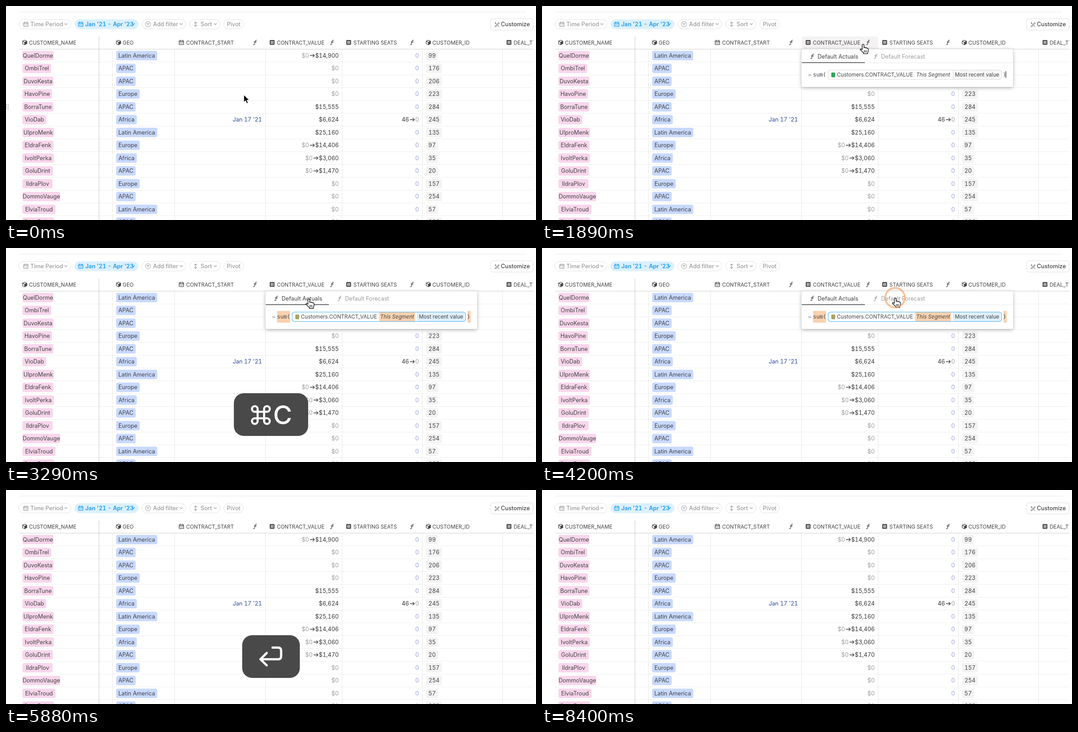
An HTML page for the animation above (9030 ms loop, 1177x476 px).

```html
<!DOCTYPE html>
<html lang="en">
<head>
<meta charset="utf-8">
<title>Table formula editing</title>
<style>
  html, body { margin: 0; width: 100%; height: 100%; overflow: hidden; background: #fff; }
  svg { display: block; font: 12.6px Inter, sans-serif; font-variant-numeric: tabular-nums; fill: #424242; }
  .head { font-size: 11.6px; }
  .tool { font-size: 12.7px; font-weight: 500; fill: #9b9b9b; }
  .formula { font-size: 11.65px; }
  .mono { font: 12px "DejaVu Sans Mono", monospace; }
  .big { font-size: 58px; font-weight: 500; fill: #fff; }
  .line { fill: none; stroke: currentColor; stroke-linecap: round; stroke-linejoin: round; }
</style>
</head>
<body>
<svg id="stage" width="1177" height="476" viewBox="0 0 1177 476"></svg>
<script>
const LOOP = 9030, ROW = 28.5, TOP = 96;
const DARK = '#424242', GRAY = '#9b9b9b', BLUE = '#1b9cf2', ORANGE = '#fbd1ae';

const text = (x, y, str, attrs = '') => `<text x="${x}" y="${y}" ${attrs}>${str}</text>`;
const rect = (x, y, w, h, fill, attrs = '') =>
  `<rect x="${x}" y="${y}" width="${w}" height="${h}" fill="${fill}" ${attrs}/>`;
const path = (d, color = DARK, width = 1.2, attrs = '') =>
  `<path class="line" d="${d}" color="${color}" stroke-width="${width}" ${attrs}/>`;
const at = (x, y, body) => `<g transform="translate(${x} ${y})">${body}</g>`;
const chip = (x, y, w, fill, str) =>
  rect(x, y - 10.5, w, 21, fill, 'rx="4"') + text(x + w / 2, y + 4.5, str, 'text-anchor="middle"');

// Icons, each centred on the given point
const cube = (x, y) => at(x, y,
  path('M0-5 4.8-2.6V2.8L0 5.2-4.8 2.8V-2.6ZM-4.8-2.6 0-.2 4.8-2.6M0-.2V5') +
  `<path d="M0-.2 4.8-2.6V2.8L0 5.2Z" fill="${DARK}"/>`);
const hash = (x, y) => at(x, y, rect(-5.3, -5.3, 10.6, 10.6, DARK, 'rx="1.5"') +
  path('M-1.5-3V3M1.7-3V3M-3.2-1.5H3.2M-3.2 1.6H3.2', '#fff', 1));
const calendar = (x, y, color = DARK) => at(x, y,
  path('M-4-4H4Q5-4 5-3V4Q5 5 4 5H-4Q-5 5-5 4V-3Q-5-4-4-4ZM-5-1.4H5M-2.5-5.5V-3M2.5-5.5V-3', color) +
  path('M-2.5 1H-2.4M0 1H.1M2.5 1H2.6M-2.5 3.2H-2.4M0 3.2H.1M2.5 3.2H2.6', color));
const fn = (x, y, color = DARK) => at(x, y,
  path('M3.6-4.6Q.9-5.5.4-2.6L-.7 2.8Q-1.2 5.5-3.6 4.6M-2-1H2.8', color, 1.3));
const chevron = (x, color = GRAY) => path(`M${x - 2.6} 39l2.6 2.6 2.6-2.6`, color);
const arrow = (x, y) => path(`M${x} ${y}h9.4m-3.4-3.4 3.4 3.4-3.4 3.4`, DARK, 1.3);

function toolbar() {
  const pill = (x, end, fill = '#fff', stroke = '#e2e2e2') =>
    rect(x + .5, 30, end - x - 1, 21, fill, `rx="10.5" stroke="${stroke}"`);
  const label = (x, str, attrs = '') => text(x, 45, str, `class="tool" ${attrs}`);
  return rect(29, 13, 1127, 1, '#e9e9e9') +
    pill(28, 145) + calendar(44, 40.5, GRAY) + label(54, 'Time Period') + chevron(133) +
    pill(152, 294, '#dcf0fd', '#dcf0fd') + calendar(166, 40.5, BLUE) +
    label(176, "Jan '21 - Apr '23", `style="fill:${BLUE};font-weight:600"`) + chevron(283, BLUE) +
    pill(301, 400) + path('M309.5 40.5a6 6 0 1 0 12 0a6 6 0 1 0-12 0M312.5 38.5h6M313.5 40.7h4M314.7 43h1.6', GRAY, 1) +
    label(326.5, 'Add filter') + chevron(389) +
    pill(407, 476) + path('M421 35.5v10M418.5 38l2.5-2.6 2.5 2.6M418.5 43l2.5 2.6 2.5-2.6', GRAY) +
    label(432, 'Sort') + chevron(465) +
    pill(483, 528) + label(490.5, 'Pivot') +
    rect(1076.5, 28.5, 94, 25, '#fff', 'rx="5" stroke="#dedede"') +
    path('M1086 45l8-8 1.5 1.5-8 8ZM1086 37l3 3M1092 43l3 3M1086.5 38.5l1.5-1.5', DARK, 1) +
    label(1099, 'Customize', `style="fill:${DARK}"`);
}

function header() {
  const label = (x, str) => text(x, 85.6, str, 'class="head"');
  return cube(41.5, 81) + label(51, 'CUSTOMER_NAME') +
    cube(250, 81) + label(259, 'GEO') +
    calendar(389.5, 81) + label(400, 'CONTRACT_START') + fn(553, 81) +
    hash(591, 81) + label(601.5, 'CONTRACT_VALUE') + fn(724, 81) +
    hash(761, 81) + label(771.5, 'STARTING SEATS') + fn(901.5, 81) +
    cube(938, 81) + label(947, 'CUSTOMER_ID') +
    hash(1117, 81) + label(1127.5, 'DEAL_TYPE') +
    rect(1171, 60, 6, 416, '#fff') + rect(29, 95.5, 1142, 1, '#cdcdcd');
}

// name, name chip width, region, contract value, value was $0 before, id
const customers = [
  ['QuelDorme', 69, 'Latin America', '$14,900', 1, 99],
  ['OmbiTrel', 64, 'APAC', '$0', 0, 176],
  ['DuvoKesta', 69, 'APAC', '$0', 0, 206],
  ['HavoPine', 65.5, 'Europe', '$0', 0, 223],
  ['BorraTune', 69, 'APAC', '$15,555', 0, 284],
  ['VioDab', 53, 'Africa', '$6,624', 0, 245],
  ['UlproMenk', 70, 'Latin America', '$25,160', 0, 135],
  ['EldraFenk', 69, 'Europe', '$14,406', 1, 97],
  ['IvoltPerka', 70, 'Africa', '$3,060', 1, 35],
  ['GoluDrint', 67.5, 'APAC', '$1,470', 1, 20],
  ['IldraPlov', 67, 'Europe', '$0', 0, 157],
  ['DommoVauge', 84, 'APAC', '$0', 0, 254],
  ['ElviaTroud', 73.5, 'Latin America', '$0', 0, 57],
  ['GuvaBolne', 70, 'APAC', '$0', 0, 268]
];
const geoWidth = { 'Latin America': 91.5, APAC: 43.5, Europe: 52.5, Africa: 46 };

function tableRow([name, nameWidth, geo, value, changed, id], i) {
  const y = TOP + ROW * (i + .5), base = y + 4.5;
  const right = (x, str, color) => text(x, base, str, `text-anchor="end" style="fill:${color}"`);
  const valueStart = 739 - (value.length - 1) * 8 - 4;
  return rect(29, y + ROW / 2 - .5, 1142, 1, '#eeeeee') +
    chip(36.5, y, nameWidth, '#f8d6ec', name) +
    chip(244.5, y, geoWidth[geo], '#c8d9fe', geo) +
    chip(933, y, id > 99 ? 35 : 26.5, '#f3f3f3', id) +
    right(739, value, value === '$0' ? GRAY : '#333') +
    (changed ? arrow(valueStart - 11.5, y) + right(valueStart - 14, '$0', GRAY) : '') +
    (i === 5
      ? right(568.5, "Jan 17 '21", '#2d4b9b') + right(895, '46', '#333') + arrow(897.5, y) + right(917, '0', GRAY)
      : right(917, '0', '#949fd6'));
}

const columnLines = () =>
  [236, 374, 576, 746, 924, 1102].map(x => rect(x, TOP, 1, 380, '#e8e8e8')).join('') +
  rect(206, 68, 1, 408, '#c6c6c6');

function popover(id, { forecast, short, selected }) {
  const width = short ? 441.5 : 469.5;
  const tab = (x, str, active) => fn(x, 112, active ? DARK : GRAY) +
    text(x + 12, 116.5, str, `style="fill:${active ? DARK : GRAY}"`);
  const [start, end, split] = short ? [606.5, 875.5, 806] : [635.5, 1020.5, 912];
  const italicX = short ? 725 : 831;
  const mark = (x, w, y = 140, h = 26) => selected ? rect(x, y, w, h, ORANGE) : '';
  const label = (x, str, attrs = '') => text(x, 157, str, `class="formula" ${attrs}`);
  const mono = (x, str, color = DARK) => text(x, 157, str, `class="mono" style="fill:${color}"`);
  const edge = selected ? '#45b0f3' : '#dcdcdc';
  const outline = (fill, stroke) => rect(start, 142.5, end - start, 21, fill, `rx="5" stroke="${stroke}"`);
  return `<g id="${id}" display="none">` +
    rect(576.5, 96, width, 84, '#fff', 'rx="4" filter="url(#shadow)"') +
    rect(577, 126, width - 1, 1, '#e9e9e9') +
    (forecast ? rect(717, 125.2, 148, 1.5, DARK) : rect(577, 125.2, 140, 1.5, DARK)) +
    tab(600, 'Default Actuals', !forecast) + tab(741, 'Default Forecast', forecast) +
    mono(591, '=', GRAY) +
    (short ? mark(600, 7) + mark(879, 8) : mark(602, 29) + mark(1025, 7) + mono(602, 'sum(') + mono(1023.5, ')')) +
    outline('#fff', edge) +
    rect(split, 143, end - split - 2, 20, selected ? '#dfeffc' : '#f6f6f6') +
    (selected ? mark(italicX - 2, 79.5, 143, 20) : rect(split, 143, 1, 20, '#e2e2e2')) +
    outline('none', edge) +
    (short
      ? label(612, 'CONTRACT_VALUE') + label(810.5, 'Last month')
      : rect(642.5, 148, 8.5, 10.5, selected ? '#aaa268' : '#2fa45c', 'rx="1"') +
        label(655, 'Customers.CONTRACT_VALUE') + label(917, 'Most recent value')) +
    label(italicX, 'This Segment', 'font-style="italic"') +
    (selected ? '' : rect(short ? 881 : 1029.5, 145, 1.2, 15, '#222', 'class="caret"')) + '</g>';
}

const commandLoop = [0, 90, 180, 270].map(angle =>
  path('M7.2 7.2V13.5A6.3 6.3 0 1 0 13.5 7.2ZM-7.2 7.2H7.2', '#fff', 4.6, `transform="rotate(${angle})"`)).join('');

function keyCard(id, width, body) {
  return `<g id="key${id}" display="none">` +
    rect(588.5 - width / 2, 323, width, 95, '#494949', 'rx="22"') + body + '</g>';
}
const commandKey = (letter, width, x) =>
  keyCard(letter, width, at(x, 371.5, commandLoop) + text(x + 27, 392, letter, 'class="big"'));

const pointer = `<g id="arrow"><path d="M0 0V17.5L4 13.8 6.7 20 9.8 18.7 7.2 12.6H12.6Z"
    fill="#000" stroke="#fff" stroke-width="1.3" stroke-linejoin="round"/></g>
  <g id="hand"><path d="M-1.5 12V2.2a2 2 0 0 1 4 0V8a1.9 1.9 0 0 1 3.5.6a1.8 1.8 0 0 1 3.3.8a1.6 1.6 0 0 1 2.7 1.4V15q0 2-1.5 4v2.2h-9V19Q-2 16-5.5 12.5q-.8-1.7.8-2q1.6 0 3.2 1.5z"
    fill="#fff" stroke="#111" stroke-width="1.4" stroke-linejoin="round"/>${path('M3 14v4M5.4 14v4M7.8 14v4', '#111', 1)}</g>`;

const dots = [0, 1, 2, 3, 4, 5].map(n =>
  `<circle cx="${1 + n % 2 * 4}" cy="${(n >> 1) * 4.5 - 4.5}" r="1.2" fill="#b0b0b0"/>`).join('');

document.getElementById('stage').innerHTML =
  `<filter id="shadow" x="-10%" y="-30%" width="120%" height="170%">
    <feDropShadow dx="0" dy="2" stdDeviation="4.5" flood-opacity=".3"/></filter>` +
  rect(577, 68, 169, 27.5, '#f4f2f2', 'id="hover"') +
  toolbar() + customers.map(tableRow).join('') + columnLines() + header() +
  `<g id="handle">${dots}</g>` +
  popover('actuals', {}) +
  popover('actualsSelected', { selected: true }) +
  popover('forecast', { forecast: true, short: true }) +
  popover('forecastSelected', { forecast: true, short: true, selected: true }) +
  popover('pasted', { forecast: true }) +
  '<g id="keys">' +
  commandKey('A', 161, 568) + commandKey('C', 165, 566) + commandKey('V', 161, 568) +
  keyCard('Enter', 128, path('M592 350.5H604Q611 350.5 611 357.5V369.5Q611 376.5 604 376.5H566M579 362.5L565 376.5 579 390', '#fff', 5)) +
  '</g>' +
  `<g id="pointer">${pointer}</g>` +
  '<circle id="ring" fill="none" stroke="#f0a467" stroke-width="4"/>';

// Timelines: [start, value]
const popovers = [[0, ''], [1330, 'actuals'], [2940, 'actualsSelected'], [4340, 'forecast'],
  [4690, 'forecastSelected'], [5110, 'pasted'], [5810, '']];
const keys = [[0, ''], [2900, 'keyA'], [3290, 'keyC'], [3780, ''], [4600, 'keyA'],
  [5040, 'keyV'], [5740, 'keyEnter'], [6370, '']];
const keyBlocks = [[2900, 3780], [4600, 6370]];
const moves = [[70, 840, 727, 75], [1750, 2170, 672, 113], [3640, 4100, 784, 111], [7140, 7770, 760, 500]];
const clicks = [1120, 2380, 4150];

const $ = id => document.getElementById(id);
const clamp = v => Math.min(1, Math.max(0, v));
const ease = p => p * p * (3 - 2 * p);
const show = (id, visible) => $(id).setAttribute('display', visible ? 'inline' : 'none');
const current = (line, t) => line.filter(([start]) => start <= t).pop()[1];
const showOnly = (line, t) => {
  const active = current(line, t);
  new Set(line.map(step => step[1]).filter(Boolean)).forEach(id => show(id, id === active));
  return active;
};

function cursorAt(t) {
  let x = 528, y = 197;
  for (const [from, to, nextX, nextY] of moves) {
    const p = ease(clamp((t - from) / (to - from)));
    x += (nextX - x) * p;
    y += (nextY - y) * p;
  }
  return [x, y];
}

function draw(t) {
  const [x, y] = cursorAt(t);
  const open = showOnly(popovers, t);
  const hand = t < 6000 && (open || y < TOP);
  const visible = t < 5810 || (t >= 7140 && t < 7770);
  show('pointer', visible);
  show('arrow', !hand);
  show('hand', hand);
  $('pointer').setAttribute('transform', `translate(${x} ${y})`);
  show('hover', hand && y < TOP);

  const row = Math.floor((y + 15 - TOP) / ROW);
  show('handle', visible && !hand && row >= 0);
  $('handle').setAttribute('transform', `translate(0 ${TOP + ROW * (row + .5)})`);
  $('pasted').querySelector('.caret').setAttribute('opacity', t < 5530 ? 1 : 0);

  showOnly(keys, t);
  const block = keyBlocks.find(([from, to]) => t >= from && t < to);
  $('keys').setAttribute('opacity', block ? clamp((t - block[0]) / 100) * clamp((block[1] - t) / 140) : 0);

  const age = t - clicks.filter(start => start <= t).pop();
  show('ring', age < 420);
  if (age < 420) {
    const ring = $('ring');
    ring.setAttribute('cx', x);
    ring.setAttribute('cy', y - .5);
    ring.setAttribute('r', 56 * (1 - Math.exp(-age / 104)));
    ring.setAttribute('opacity', .65 * clamp((420 - age) / 170));
  }
}

const startTime = performance.now();
function tick() {
  draw((performance.now() - startTime) % LOOP);
  requestAnimationFrame(tick);
}
tick();
</script>
</body>
</html>
```
